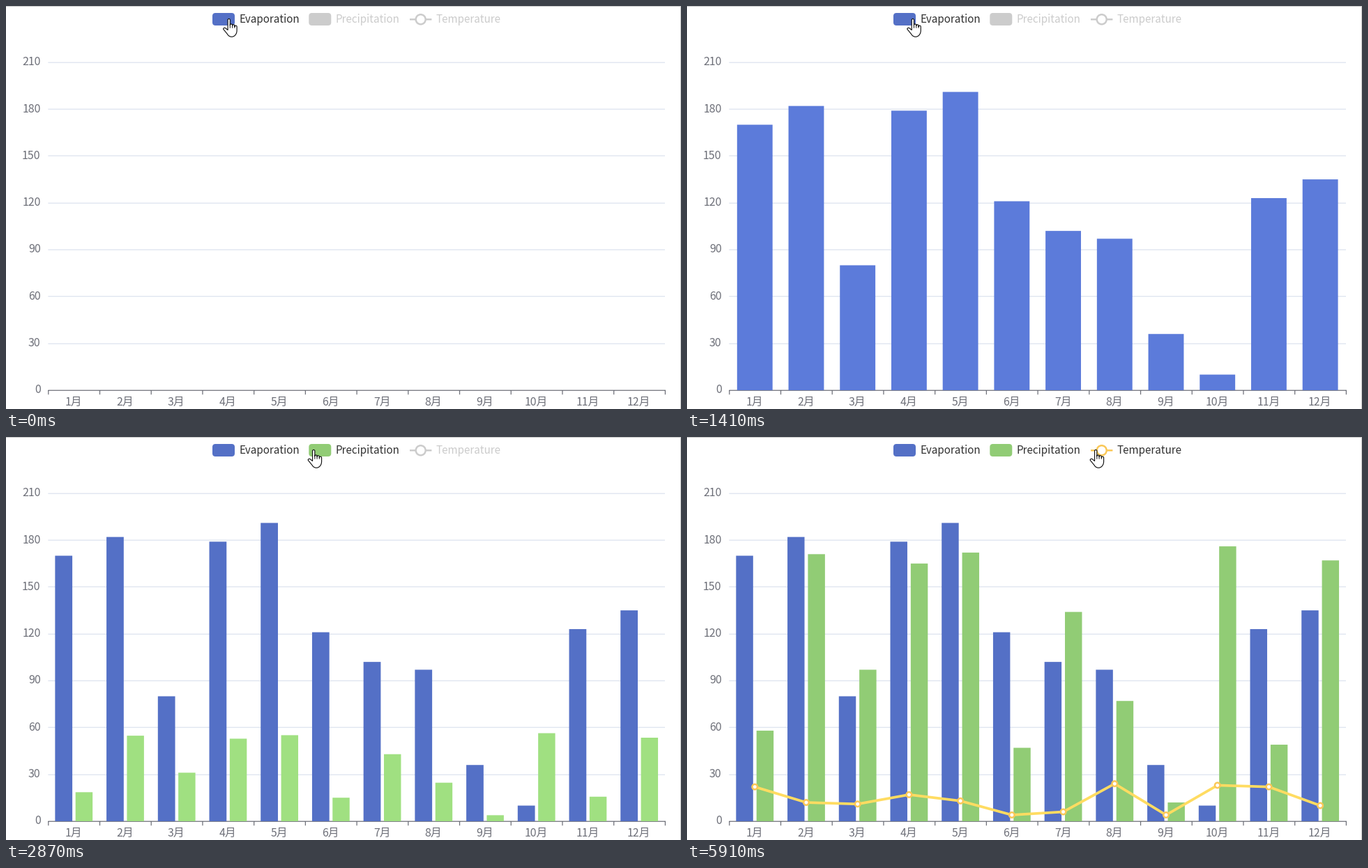
Recreate the animation shown at these times as a matplotlib script. Size 968x579 px, loop 7.33 s.

```python
import numpy as np
import matplotlib.pyplot as plt
from matplotlib.animation import FuncAnimation
from matplotlib.patches import FancyBboxPatch, PathPatch
from matplotlib.path import Path

W, H, DPI = 968, 579, 64
PT = 72 / DPI                     # points per pixel
LOOP, INTERVAL = 7330, 10

BLUE, GREEN, YELLOW = "#5470c6", "#91cc75", "#fac858"
BLUE_LIT, GREEN_LIT, YELLOW_LIT = "#5c7bda", "#a0e081", "#ffdc61"
GRID, AXIS, TEXT, OFF = "#e0e6f1", "#6e7079", "#333333", "#cccccc"

evaporation = np.array([170, 182, 80, 179, 191, 121, 102, 97, 36, 10, 123, 135])
precipitation = np.array([58, 171, 97, 165, 172, 47, 134, 77, 12, 176, 49, 167])
temperature = np.array([22, 12, 11, 17, 13, 4, 6, 24, 4, 23, 22, 10])

LEFT, WIDTH, BASE, UNIT = 60.4, 884.6, 552, 2.24375
BAND = WIDTH / 12
centres = LEFT + BAND * (np.arange(12) + 0.5)
WIDE, PAIR = 0.69 * BAND, 0.73 * BAND
SLIM = PAIR / 2.2

# Each act starts at a given time; the picture then refreshes at a fixed step.
SHOW_BLUE, MOVE_1, SHOW_GREEN, MOVE_2, SHOW_LINE = 70, 1410, 2480, 3580, 4660
STEPS = {SHOW_BLUE: 80, MOVE_1: 76, SHOW_GREEN: 78, MOVE_2: 76, SHOW_LINE: 80}
BLUE_START, GREEN_START, LINE_START = -71, 2439, 4678


def refreshed(time):
    """Time of the latest refresh of the picture."""
    begun = [start for start in STEPS if start <= time]
    if not begun:
        return -np.inf
    start = begun[-1]
    return time - (time - start) % STEPS[start]


def clamp(u):
    return min(max(u, 0.0), 1.0)


def cubic_in_out(u):
    u = clamp(u)
    return 4 * u**3 if u < 0.5 else 1 - 4 * (1 - u)**3


def glide(now, start, count):
    """Smooth progress of the pointer over a number of refreshes."""
    u = clamp(((now - start) / STEPS[start] + 1) / count)
    return u * u * (3 - 2 * u)


def bars(left, width, values):
    top = BASE - UNIT * values
    return Path.make_compound_path(*[
        Path([(x, BASE), (x, y), (x + width, y), (x + width, BASE), (x, BASE)],
             closed=True) for x, y in zip(left, top)])


def segments(pairs):
    points = np.array(pairs, float).reshape(-1, 2)
    return Path(points, [Path.MOVETO, Path.LINETO] * (len(points) // 2))


plt.rcParams.update({"path.snap": False, "font.family": "Noto Sans CJK JP",
                     "toolbar": "None"})
fig = plt.figure(figsize=(W / DPI, H / DPI), dpi=DPI, facecolor="white")
ax = fig.add_axes([0, 0, 1, 1])
ax.set(xlim=(0, W), ylim=(H, 0))
ax.axis("off")


def shape(path, z, fill="none", edge="none", width=0.0, cap="butt", join="miter"):
    return ax.add_patch(PathPatch(path, fc=fill, ec=edge, lw=width * PT, zorder=z,
                                  capstyle=cap, joinstyle=join))


def label(x, y, text, color, size, align):
    return ax.text(x, y, text, color=color, fontsize=size * PT, ha=align,
                   va="baseline", zorder=6)


# Frame edges
shape(segments([(0, 0.5), (W, 0.5), (W - 0.5, 0), (W - 0.5, H)]), 0,
      edge="#c8c8c8", width=1)

# Axes
levels = np.round(BASE - 30 * UNIT * np.arange(8)) + 0.25
shape(segments([[(LEFT, y), (LEFT + WIDTH, y)] for y in levels[1:]]), 1,
      edge=GRID, width=1.4)
ticks = LEFT + 0.4 + BAND * np.arange(13)
shape(segments([[(LEFT, levels[0]), (LEFT + WIDTH + 1, levels[0])]]
               + [[(x, BASE), (x, BASE + 6.25)] for x in ticks]), 1,
      edge=AXIS, width=1.25)
for k in range(8):
    label(49.6, BASE - 30 * UNIT * k + 4.4, str(30 * k), AXIS, 16, "right")
for k, x in enumerate(centres):
    label(x - 0.4, 574, f"{k + 1}月", AXIS, 15.9, "center")


# Legend
def swatch(x, color):
    return ax.add_patch(FancyBboxPatch(
        (x, 10), 32, 18, boxstyle="round,pad=0,rounding_size=4.4",
        fc=color, ec="none", lw=0, zorder=6))


swatch(296, BLUE)
label(334, 24, "Evaporation", TEXT, 15.2, "left")
green_icon = swatch(434.3, OFF)
green_text = label(472, 24, "Precipitation", OFF, 15.2, "left")
dash_icon = shape(segments([(579, 19.25), (610.4, 19.25)]), 6, edge=OFF, width=2.5)
ring_icon = shape(Path.circle((594.7, 19.25), 7), 7, "white", OFF, 2.5)
line_text = label(616.5, 24, "Temperature", OFF, 15.2, "left")

# Series
EMPTY = Path(np.empty((0, 2)))
blue_bars = shape(EMPTY, 2, BLUE)
green_bars = shape(EMPTY, 3, GREEN)
curve = shape(EMPTY, 4, edge=YELLOW_LIT, width=3.75, join="bevel")
dots = shape(EMPTY, 5, "white", YELLOW, 2.5)


def arc(x, y, rx, ry, start, end):
    angle = np.pi * np.linspace(start, end, 12)
    return np.column_stack([x + rx * np.cos(angle), y + ry * np.sin(angle)])


# Hand pointer: four rounded fingertips, an oval palm and a thumb
FINGER, SPACING = 1.65, 3.25
finger_x = 8.7 + SPACING * np.arange(4)
finger_y = np.array([2.8, 10.3, 11.1, 12.5])
hand_points = np.vstack(
    [arc(x, y, FINGER, FINGER, 1, 2) for x, y in zip(finger_x, finger_y)]
    + [arc(12.6, 18, 7.5, 9, 0, 0.82), arc(2.6, 15.6, 1.9, 1.5, 0.85, 1.7),
       [(7.05, 17.2), (7.05, 2.8)]])
knuckle_points = np.array([[(x - SPACING / 2, y), (x - SPACING / 2, 14.4)]
                           for x, y in zip(finger_x[1:], finger_y[1:])])
hand = shape(EMPTY, 9, "white", "#111111", 1.15, join="round")
knuckles = shape(EMPTY, 10, edge="#111111", width=1)


def move_hand(x, y):
    hand.set_path(Path(hand_points + (x, y)))
    knuckles.set_path(segments(knuckle_points + (x, y)))


def draw_bars(now, away_blue, away_green):
    grow = cubic_in_out((now - BLUE_START) / 1000)
    squeeze = cubic_in_out((now - GREEN_START) / 500)
    width = WIDE + (SLIM - WIDE) * squeeze
    left = centres - (WIDE + (PAIR - WIDE) * squeeze) / 2
    blue_bars.set_path(bars(left, width, evaporation * grow))
    blue_bars.set_facecolor(BLUE if away_blue else BLUE_LIT)

    rise = cubic_in_out((now - GREEN_START) / 1000)
    green_bars.set_path(bars(centres + PAIR / 2 - SLIM, SLIM, precipitation * rise))
    green_bars.set_facecolor(GREEN if away_green else GREEN_LIT)


def draw_curve(now):
    u = (now - LINE_START) / 1000
    edge = LEFT + WIDTH * clamp(u)
    heights = BASE - UNIT * temperature
    seen = centres < edge
    if not seen.any():
        curve.set_path(EMPTY)
        dots.set_path(EMPTY)
        return
    xs = np.append(centres[seen], min(edge, centres[-1]))
    curve.set_path(Path(np.column_stack([xs, np.interp(xs, centres, heights)])))
    # Each marker pops up within 200 ms once the line reaches it.
    scale = np.clip((u - (centres - LEFT) / WIDTH) / 0.2, 0, 1)
    dots.set_path(Path.make_compound_path(
        *[Path.circle((x, y), 3.75 * s)
          for x, y, s in zip(centres, heights, scale) if s > 0]))


def draw_legend(now):
    on = now >= SHOW_GREEN
    green_icon.set_facecolor(GREEN if on else OFF)
    green_text.set_color(TEXT if on else OFF)
    on = now >= SHOW_LINE
    for icon in (dash_icon, ring_icon):
        icon.set_edgecolor(YELLOW if on else OFF)
    line_text.set_color(TEXT if on else OFF)


def update(frame):
    now = refreshed(frame * INTERVAL)
    first, second = glide(now, MOVE_1, 9), glide(now, MOVE_2, 10)
    move_hand(311 + 121.5 * first + 145 * second, 17.3)
    draw_legend(now)
    # Bars lose their highlight once the pointer leaves the legend entry.
    draw_bars(now, first > 0.83, second > 0.85)
    draw_curve(now)
    return []


anim = FuncAnimation(fig, update, frames=LOOP // INTERVAL, interval=INTERVAL,
                     init_func=lambda: update(0), repeat=True, repeat_delay=0,
                     blit=False, cache_frame_data=False)
plt.show()
```
